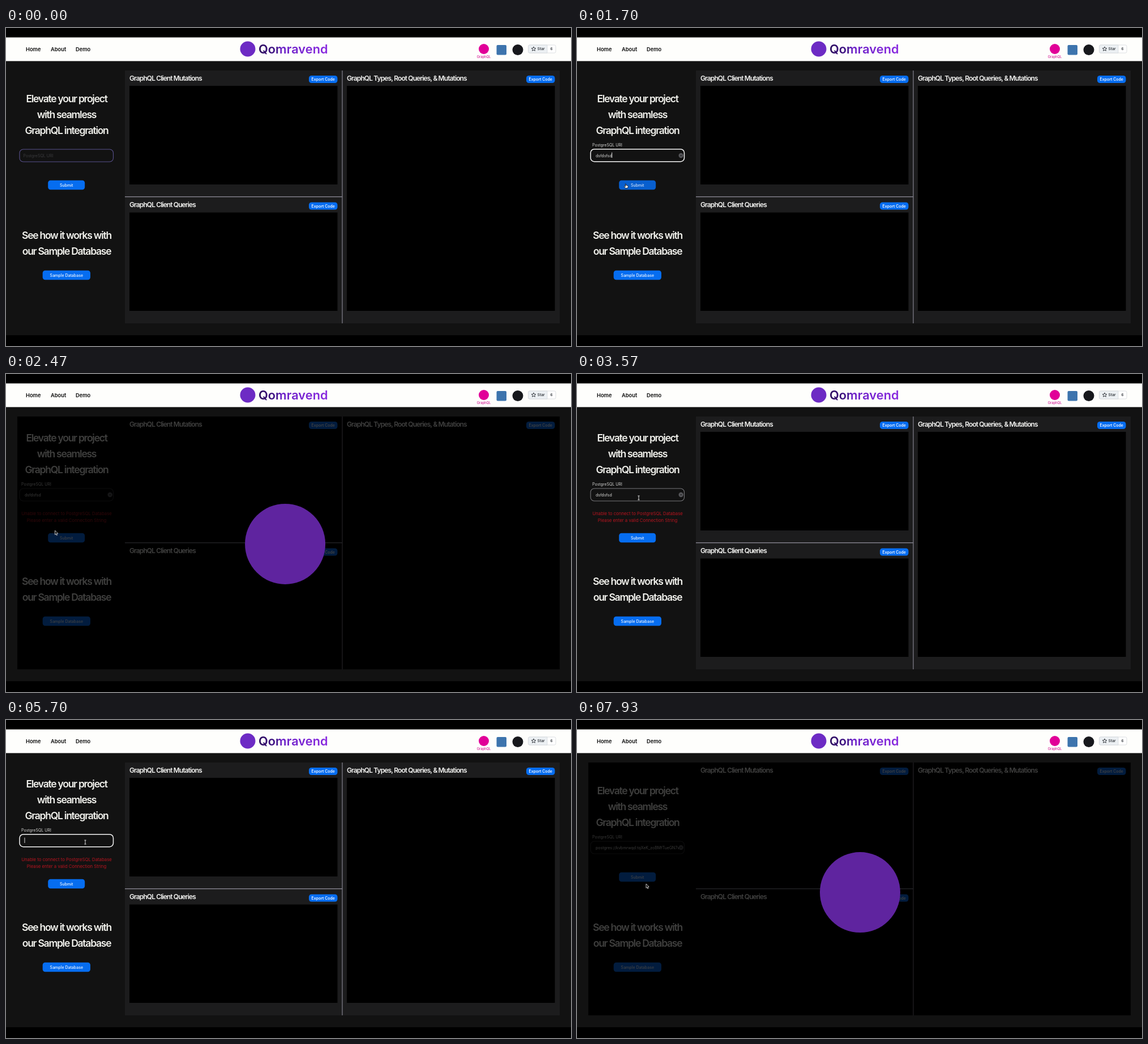
Write an HTML page with a canvas that moves like this. It is 998 px wide and 561 px high and loops after 8000 ms.

```html
<!DOCTYPE html>
<html lang="en">
<head>
<meta charset="utf-8">
<title>Qomravend</title>
<style>
html, body { margin: 0; width: 100%; height: 100%; overflow: hidden; background: #000; }
canvas { display: block; width: 998px; height: 561px; }
</style>
</head>
<body>
<canvas id="stage" width="998" height="561"></canvas>
<script>
const ctx = document.getElementById('stage').getContext('2d');
const LOOP = 8000;
const BLUE = '#066df0';
const TYPED = 'dsfdsfsd';
const URI = 'postgres://kvbmrwqd:tqXeK_zoBMfTueGN7ww3';

// Pointer path: time, x, y
const PATH = [
  [1200, 110, 226], [1640, 86, 275], [3230, 87, 277], [3570, 109, 218.5],
  [4000, 180, 216], [4070, 182, 216], [4200, 187, 216], [4370, 187, 216],
  [4470, 204, 216], [4670, 204, 216], [4740, 184, 214], [4800, 184, 214],
  [5030, 140, 215.5], [6200, 140, 215.5], [6900, 122, 289]
];
// Loading phases: start, end, moment with a known spin angle, that angle
const LOADS = [
  { from: 2030, to: 3000, ref: 2470, angle: 161.6 },
  { from: 7630, to: LOOP, ref: 7930, angle: 80.5 }
];

const clamp = v => Math.max(0, Math.min(1, v));
const ease = v => v * v * (3 - 2 * v);
const ramp = (t, a, b) => ease(clamp((t - a) / (b - a)));

function rect(x, y, w, h, color) {
  ctx.fillStyle = color;
  ctx.fillRect(x, y, w, h);
}

function rounded(x, y, w, h, r, fill, stroke, line = 1) {
  ctx.beginPath();
  ctx.roundRect(x, y, w, h, r);
  if (fill) { ctx.fillStyle = fill; ctx.fill(); }
  if (stroke) { ctx.strokeStyle = stroke; ctx.lineWidth = line; ctx.stroke(); }
}

function disc(x, y, r, color) {
  ctx.beginPath();
  ctx.arc(x, y, r, 0, Math.PI * 2);
  ctx.fillStyle = color;
  ctx.fill();
}

// y is the middle of the capital letters
function text(str, x, y, size, color, { weight = 400, align = 'left', track = 0 } = {}) {
  ctx.font = `${weight} ${size}px Inter, "Open Sans", sans-serif`;
  ctx.letterSpacing = track + 'px';
  ctx.textAlign = align;
  ctx.fillStyle = color;
  ctx.fillText(str, x, y + size * 0.364);
  return ctx.measureText(str).width;
}

function button(label, x, y, w, h, weight = 500, size = 7) {
  rounded(x, y, w, h, 4.5, BLUE);
  text(label, x + w / 2, y + h / 2, size, '#f4f8ff', { weight, align: 'center' });
}

function heading(lines, y) {
  lines.forEach((line, i) =>
    text(line, 107, y + i * 27.9, 17.6, '#f1f1ec', { weight: 600, align: 'center', track: -1.3 }));
}

function star(x, y, r) {
  ctx.beginPath();
  for (let i = 0; i < 10; i++) {
    const a = -Math.PI / 2 + i * Math.PI / 5, d = i % 2 ? r * 0.45 : r;
    ctx.lineTo(x + d * Math.cos(a), y + d * Math.sin(a));
  }
  ctx.closePath();
  ctx.strokeStyle = '#24292f';
  ctx.lineWidth = 0.9;
  ctx.stroke();
}

function header() {
  rect(0, 16.6, 998, 41.8, '#fefefc');
  ['Home', 'About', 'Demo'].forEach((s, i) =>
    text(s, [35, 79, 123][i], 38, 9.3, '#0b0b0b', { weight: 600 }));

  disc(427, 37, 13.5, '#6d2bc4');
  const ink = ctx.createLinearGradient(446, 0, 568, 0);
  ink.addColorStop(0, '#2b0d5c');
  ink.addColorStop(0.28, '#451390');
  ink.addColorStop(0.32, '#6a1fc6');
  ink.addColorStop(1, '#8a2be0');
  text('Qomravend', 446, 37, 21.8, ink, { weight: 600 });

  disc(844, 37, 9, '#e10098');
  text('GraphQL', 844, 50.5, 5.8, '#d6249a', { weight: 500, align: 'center' });
  rounded(866.5, 30, 17.5, 17.5, 2, '#3d74ad');
  disc(904, 38.5, 9.5, '#17181c');

  rounded(922.5, 30, 48.5, 14, 2.5, '#fff', '#d3d7db', 0.8);
  rounded(922.5, 30, 33.5, 14, [2.5, 0, 0, 2.5], '#ecf0f3', '#d3d7db', 0.8);
  star(932, 37, 4);
  text('Star', 938.5, 37, 6.8, '#24292f', { weight: 500 });
  text('6', 963.5, 37, 6.6, '#24292f', { weight: 500, align: 'center' });
}

function pane(title, x, y, h) {
  text(title, x, y - 13.5, 12, '#f4f4f2', { weight: 600, track: -0.9 });
  button('Export Code', x + 317, y - 18, 50.5, 13, 600, 6.9);
  rect(x, y, 367.5, h, '#000');
}

function panels() {
  pane('GraphQL Client Mutations', 218, 102, 174);
  pane('GraphQL Client Queries', 218, 325.5, 173.5);
  pane('GraphQL Types, Root Queries, & Mutations', 602, 102, 397);
  rect(210, 297, 384, 1.4, '#85838f');
  rect(593.4, 75, 1.2, 446, '#85838f');
}

function state(t) {
  const focused = (t >= 380 && t < 1990) || (t >= 4710 && t < 7530);
  let value = '';
  if (t < 4710) value = TYPED.slice(0, Math.max(0, Math.floor((t - 560) / 75)));
  else if (t >= 5900) value = URI;
  const blink = Math.floor((t - (t < 5900 ? 4700 : 5900)) / 500) % 2 === 0;
  const load = LOADS.find(l => t >= l.from && t < l.to);
  let shade = 0;
  if (load) shade = ramp(t, load.from - 40, load.from + 60) * (load.to < LOOP ? 1 - ramp(t, load.to - 60, load.to) : 1);
  return { focused, value, load, shade, caret: focused && (t < 1990 || blink), error: t >= 2300 && t < 7640 };
}

// Flat surfaces sink to black under the loading shade
function surfaces(shade) {
  rect(0, 58.4, 998, 483.6, '#121212');
  rect(210, 75, 768, 446, '#1c1c1d');
  rect(20, 75, 958, 446, `rgba(0,0,0,${shade})`);
}

function field(t, s, dy) {
  const lift = ramp(t, 380, 560);
  const label = lift < 0.5 ? '#3b3b3d' : '#d2d2d0';
  text('PostgreSQL URI', 30.5 - 3.5 * lift, 225 + dy - 18.3 * lift, 7, label);
  const edge = s.focused ? '#f4f4f4' : t < 380 ? '#58508c' : '#77777a';
  ctx.globalAlpha = 1 - 0.6 * s.shade;
  rounded(24, 214 + dy - (s.focused ? 0.3 : 0), 165.5, 22, 6.5, null, edge, s.focused ? 1.5 : 1.1);
  ctx.globalAlpha = 1;

  ctx.save();
  ctx.beginPath();
  ctx.rect(30, 212 + dy, 150, 26);
  ctx.clip();
  const w = s.value ? text(s.value, 33, 225.3 + dy, 7, '#d8d8d6') : 0;
  if (s.caret) rect(32.5 + w, 219.5 + dy, 0.9, 9.5, '#f0f0f0');
  ctx.restore();

  if (s.value) {
    const cy = 225 + dy;
    disc(183.7, cy, 4.2, '#56565a');
    ctx.beginPath();
    for (const d of [-1, 1]) {
      ctx.moveTo(183.7 - 1.4, cy - 1.4 * d);
      ctx.lineTo(183.7 + 1.4, cy + 1.4 * d);
    }
    ctx.strokeStyle = '#161616';
    ctx.lineWidth = 0.8;
    ctx.stroke();
  }
}

function sidebar(t, s) {
  const dy = s.error ? -12 : 0;
  heading(['Elevate your project', 'with seamless', 'GraphQL integration'], 124.7 + dy);
  field(t, s, dy);
  if (s.error) {
    text('Unable to connect to PostgreSQL Database', 107, 246.3, 7.8, '#b8141f', { align: 'center' });
    text('Please enter a valid Connection String', 107, 258.5, 7.8, '#b8141f', { align: 'center' });
  }

  const hover = t < 3000 ? ramp(t, 1600, 1720) * (1 - ramp(t, 2030, 2150))
    : ramp(t, 6850, 7000) * (1 - ramp(t, 7640, 7760));
  const press = ramp(t, 1960, 2000) * (1 - ramp(t, 2040, 2100)) + ramp(t, 7500, 7560) * (1 - ramp(t, 7630, 7700));
  ctx.save();
  ctx.translate(106.7, 277 - dy);
  ctx.scale(1 - 0.03 * press, 1 - 0.03 * press);
  ctx.globalAlpha = 1 - 0.16 * hover;
  button('Submit', -32.5, -8.2, 65, 16.4);
  ctx.restore();

  heading(['See how it works with', 'our Sample Database'], 365.5);
  button('Sample Database', 64.7, 427.8, 84.3, 16.4);
}

function loading(t, { load, shade }) {
  ctx.save();
  ctx.globalAlpha = shade;
  rect(20, 75, 958, 446, 'rgba(0,0,0,0.74)');
  const a = (load.angle + 0.36 * (t - load.ref)) * Math.PI / 180;
  disc(499 + 6.2 * Math.cos(a), 298 + 6.2 * Math.sin(a), 71, '#5f249f');
  ctx.restore();
}

function pointerAt(t) {
  if (t < PATH[0][0]) return null;
  const i = PATH.findIndex(p => p[0] > t);
  if (i < 0) return PATH[PATH.length - 1].slice(1);
  const [a, b] = [PATH[i - 1], PATH[i]];
  const k = ramp(t, a[0], b[0]);
  return [a[1] + (b[1] - a[1]) * k, a[2] + (b[2] - a[2]) * k];
}

function shape(points, close) {
  ctx.beginPath();
  points.forEach(p => ctx.lineTo(p[0], p[1]));
  if (close) ctx.closePath();
}

function pointer(t, s) {
  const p = pointerAt(t);
  if (!p) return;
  const [x, y] = p, dy = s.error ? -12 : 0;
  const inField = x > 24 && x < 190 && y > 214 + dy && y < 236 + dy;
  const onClear = inField && s.value && Math.abs(x - 184) < 4.5;
  const onSubmit = x > 74 && x < 139 && Math.abs(y - 277 + dy) < 8.5;
  ctx.save();
  ctx.translate(x, y);
  ctx.lineJoin = 'round';
  if (!s.load && inField && !onClear) {
    ctx.strokeStyle = '#f2f2f2';
    ctx.lineWidth = 0.9;
    shape([[-1.6, -3.5], [1.6, -3.5]]);
    ctx.stroke();
    shape([[0, -3.5], [0, 3.5]]);
    ctx.stroke();
    shape([[-1.6, 3.5], [1.6, 3.5]]);
    ctx.stroke();
  } else {
    if (!s.load && (onClear || onSubmit)) {
      shape([[-0.8, 0], [0.4, 0], [0.9, 2.6], [3.8, 3.3], [4.3, 4.4], [3.3, 7.6], [-0.2, 7.6], [-2.8, 4.6], [-2, 3.8], [-0.3, 4.8]], true);
      ctx.fillStyle = '#fff';
      ctx.strokeStyle = '#111';
    } else {
      shape([[0, 0], [0, 7.4], [1.7, 5.9], [2.8, 8.5], [4, 8], [2.9, 5.4], [5.2, 5.2]], true);
      ctx.fillStyle = '#0a0a0a';
      ctx.strokeStyle = '#e8e8e8';
    }
    ctx.lineWidth = 0.8;
    ctx.fill();
    ctx.stroke();
  }
  ctx.restore();
}

function draw(t) {
  const s = state(t);
  rect(0, 0, 998, 561, '#000');
  surfaces(s.shade);
  header();
  panels();
  sidebar(t, s);
  if (s.load) loading(t, s);
  pointer(t, s);
}

const start = performance.now();
function frame() {
  draw((performance.now() - start) % LOOP);
  requestAnimationFrame(frame);
}
frame();
</script>
</body>
</html>
```
